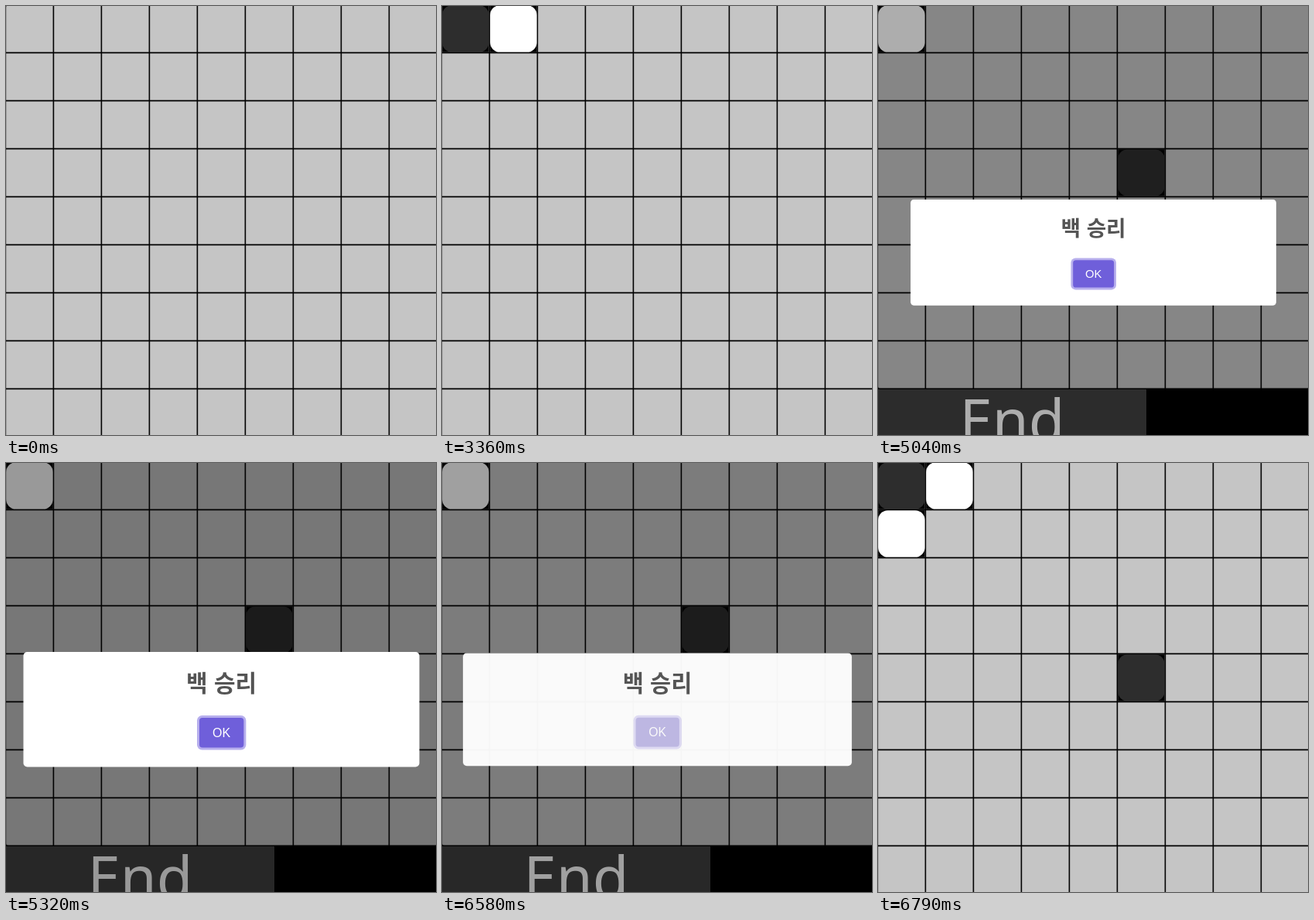
Write an HTML page that moves like this. It is 556 by 554 pixels and loops after 8120 ms.

```html
<!DOCTYPE html>
<html lang="ko">
<head>
<meta charset="utf-8">
<title>Board game</title>
<style>
  html, body { margin: 0; width: 100%; height: 100%; overflow: hidden; background: #000; }
  svg { display: block; width: 100%; height: 100%; }
  #popup { transform-origin: 278.5px 318px; }
  .title { font: 600 30px "Noto Sans CJK KR", "Noto Sans CJK", sans-serif; fill: #545454; }
  .ok { font: 16px "Liberation Sans", Arial, sans-serif; fill: #fff; }
  .end { font: 76px "Noto Sans", sans-serif; fill: #fff; }
  text { text-anchor: middle; }
</style>
</head>
<body>
<svg viewBox="0 0 556 554">
  <rect width="556" height="554"/>
  <g id="page">
    <rect y="-1" width="557" height="557" rx="3" fill="#c5c5c5"/>
    <path id="lines" stroke="#000" stroke-width="1.6"/>
    <g id="stones"></g>
    <rect y="557" width="347" height="120" fill="#404040"/>
    <text class="end" x="173.5" y="625">End</text>
  </g>
  <rect id="shade" width="556" height="554"/>
  <g id="popup">
    <rect x="22.5" y="244" width="512" height="148.5" rx="5" fill="#fff"/>
    <text class="title" x="278.5" y="295">백 승리</text>
    <g id="button">
      <rect x="247" y="326" width="63.4" height="44.4" rx="6.5" fill="#b7afed"/>
      <rect x="250" y="329" width="57.4" height="38.4" rx="4" fill="#6f5fda"/>
      <rect id="tint" x="250" y="329" width="57.4" height="38.4" rx="4"/>
      <text class="ok" x="278.6" y="353.5">OK</text>
    </g>
  </g>
</svg>
<script>
const LOOP = 8120, TICK = 70, CELL = 62;
const OPEN = 4990, CLOSE = 6572;
const $ = id => document.getElementById(id);

function addShape(parent, attrs) {
  const el = document.createElementNS('http://www.w3.org/2000/svg', 'rect');
  for (const key in attrs) el.setAttribute(key, attrs[key]);
  parent.append(el);
}

let d = '';
for (let i = 0; i <= 9; i++) {
  d += `M${i * CELL - 0.6} -1V556M0 ${i * CELL - 1.6}H557`;
}
$('lines').setAttribute('d', d);

// column, row, colour, time placed
const stones = [
  [0, 0, '#2d2d2d', 2310],
  [1, 0, '#fff', 3360],
  [5, 4, '#2d2d2d', 3990],
  [0, 1, '#fff', 5040]
].map(([col, row, fill, at]) => {
  const g = document.createElementNS('http://www.w3.org/2000/svg', 'g');
  const x = col * CELL + 0.2, y = row * CELL - 0.8;
  addShape(g, { x, y, width: 60.4, height: 60.4 });
  addShape(g, { x, y, width: 60.4, height: 60.4, rx: 12.5, fill });
  $('stones').append(g);
  return { g, at };
});

function timeline(el, steps) {
  const frames = steps.map(([ms, props]) => ({ offset: ms / LOOP, easing: 'ease', ...props }));
  const anim = el.animate(frames, { duration: LOOP, fill: 'both' });
  anim.pause();
  return anim;
}

const size = (s, opacity = 1) => ({ transform: `scale(${s})`, opacity });
const anims = [
  timeline($('popup'), [
    [0, size(0.7)], [OPEN, size(0.7)], [OPEN + 135, size(1.05)],
    [OPEN + 240, size(0.95)], [OPEN + 300, size(1)],
    [CLOSE, size(1)], [CLOSE + 150, size(0.5, 0)], [LOOP, size(0.5, 0)]
  ]),
  timeline($('shade'), [
    [0, { opacity: 0 }], [OPEN, { opacity: 0 }], [OPEN + 100, { opacity: 0.4 }],
    [CLOSE, { opacity: 0.4 }], [CLOSE + 100, { opacity: 0 }], [LOOP, { opacity: 0 }]
  ])
];

// button darkening while hovered and pressed
const tints = [[0, 0], [5670, 0.05], [5740, 0.1], [6230, 0.2], [6580, 0.1]];

const start = performance.now();
function draw(now) {
  const elapsed = Math.max(0, now - start) % LOOP;
  const t = Math.floor(elapsed / TICK) * TICK;
  const modal = t >= 5040 && t < 6790;
  for (const { g, at } of stones) g.style.display = t >= at ? '' : 'none';
  $('page').setAttribute('transform', `translate(0 ${modal ? -CELL : 0})`);
  $('popup').style.display = $('shade').style.display = modal ? '' : 'none';
  $('tint').setAttribute('opacity', tints.filter(([ms]) => t >= ms).pop()[1]);
  $('button').setAttribute('opacity', t >= 6580 ? 0.4 : 1);
  for (const anim of anims) anim.currentTime = t;
  requestAnimationFrame(draw);
}
draw(start);
</script>
</body>
</html>
```
